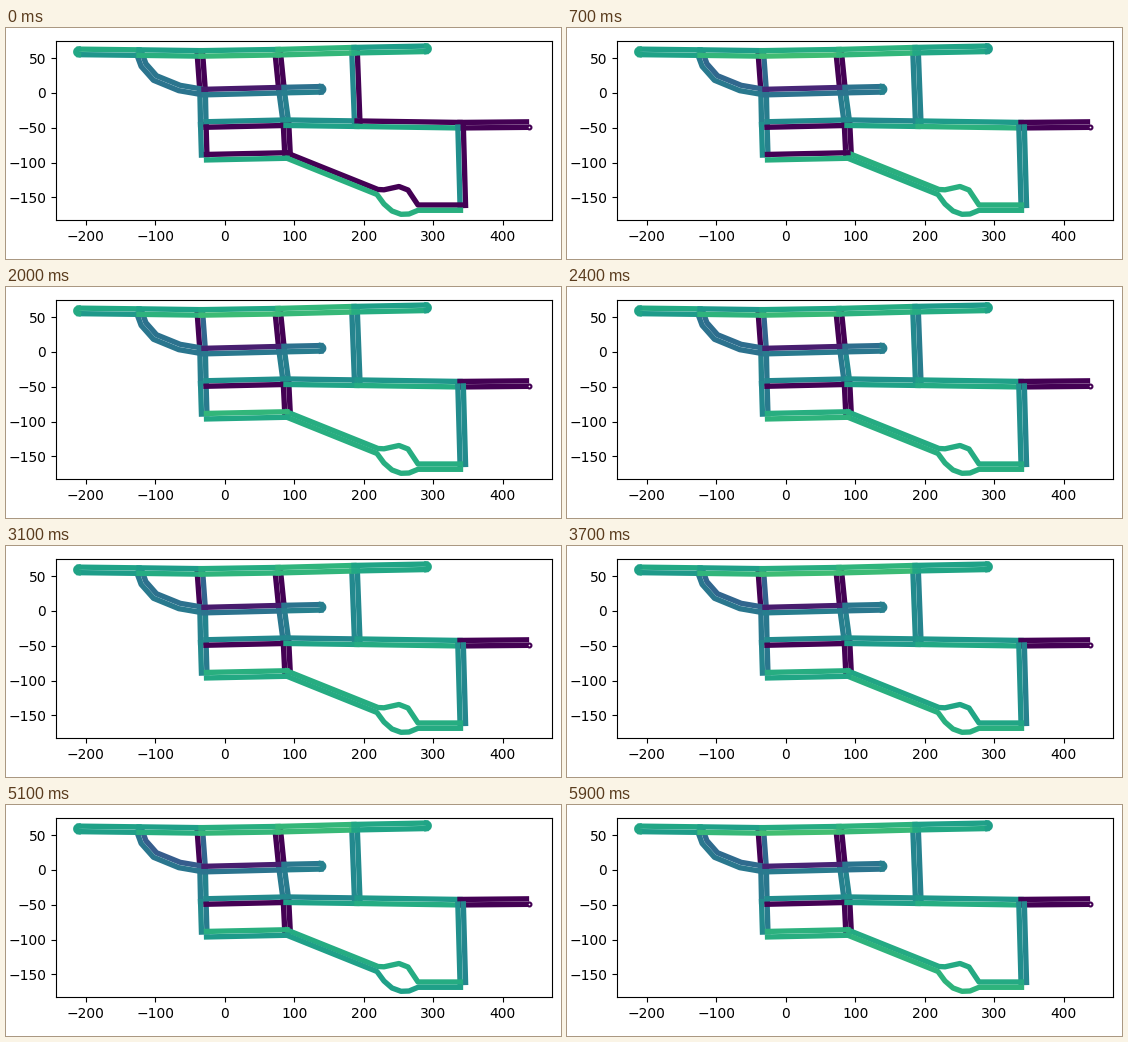
These frames come from a looping animation (555 by 231 pixels, 6000 ms). A matplotlib script:

```python
import matplotlib.pyplot as plt
import numpy as np
from matplotlib.animation import FuncAnimation
from matplotlib.collections import LineCollection

W, H, DPI = 555, 231, 100
LEFT, RIGHT, TOP, BOTTOM = 50, 546, 13, 192
SCALE = 0.695            # pixels per map unit
ORIGIN = (218.8, 65.0)   # stage position of map point (0, 0)
FRAMES, STEP = 60, 100
GAP = 2.75               # distance of a lane from the middle of its street

rng = np.random.default_rng(4)
time = np.arange(FRAMES)
rush = np.exp(-((time - 45) / 6) ** 2)   # busy spell late in the loop
paths, levels = [], []
late = 0


def to_map(points):
    p = np.asarray(points, float)
    return np.column_stack([p[:, 0] - ORIGIN[0], ORIGIN[1] - p[:, 1]]) / SCALE


def shift(points, dist):
    """Move a polyline sideways: upwards if it runs right, right if it runs down."""
    p = np.asarray(points, float)
    d = np.diff(p, axis=0)
    n = np.column_stack([d[:, 1], -d[:, 0]]) / np.hypot(*d.T)[:, None]
    n = np.vstack([n[:1], n[:-1] + n[1:], n[-1:]])
    return p + dist * n / np.hypot(*n.T)[:, None]


def lane(points, level, swing=0.0):
    """Zero stays unused; a negative level is empty until the first cars come."""
    global late
    a, b = rng.uniform(0, 2 * np.pi, 2)
    wobble = np.sin(time / 3 + a) + np.sin(time / 1.7 + b)
    series = abs(level) + 0.015 * wobble + swing * rush
    if level < 0:
        late += 1
        series[:late + 1] = 0
    paths.append(to_map(points))
    levels.append(series if level else 0 * time)


def road(points, pair, swing=(0, 0)):
    for side, level, s in zip((GAP, -GAP), pair, swing):
        lane(shift(points, side), level, s)


def street(nodes, *pairs):
    """Chain of straight roads, one pair of lane levels for each."""
    for start, end, pair in zip(nodes, nodes[1:], pairs):
        road([start, end], pair)


def turn(x, y, way, level):
    """Half circle joining both lanes at the end of a street."""
    a = np.linspace(-np.pi / 2, np.pi / 2, 9)
    lane(np.column_stack([x + way * GAP * np.cos(a), y + GAP * np.sin(a)]), level)


# vertical streets
street([(194, 27), (196.6, 63), (197.3, 96.5), (198.2, 127)],
       (-.32, 0), (.42, .43), (-.41, .47))
street([(272, 27), (275.5, 62), (280, 95.5), (281.5, 126)],
       (0, 0), (.44, .41), (0, 0))
street([(348.6, 25), (351.2, 94)], (-.45, .47))

# middle street and the curve leading to it
road([(133.5, 26), (137.5, 37), (149, 50), (173.5, 60), (194, 63.5)],
     (.36, .4), swing=(-.2, -.08))
street([(198, 64.1), (278, 62.1), (315, 61.3)], (.08, .4), (.38, .41))
turn(315, 61.3, 1, .43)

# long cross street
street([(200, 96.5), (280, 94.7), (351, 95.7), (454, 97.2), (520.5, 96.6)],
       (.47, 0), (.49, .57), (-.55, .61), (0, 0))

# lower right corner, slope with passing loop, lower street
street([(454.6, 99), (456.8, 177.5)], (-.46, .5))
lane([(281, 125), (372, 161.5), (378, 161.8), (393, 158.5), (402, 162),
      (412, 177), (454.5, 177)], -.61)
lane([(281, 130.3), (371, 166.5), (378, 176), (386, 183), (395, 186.3),
      (403, 186), (412, 182.3), (454.5, 182.3)], .63, -.16)
road([(200.5, 129.2), (281, 127.5)], (-.63, .62), swing=(0, -.15))

# top street
street([(73, 23.9), (133, 24.6), (195, 25.4), (272, 24.2), (348, 22.2), (420, 20.8)],
       (.59, .55), (.55, .64), (.61, .67), (.64, .66), (.57, .6))
turn(72.5, 23.9, -1, .58)
turn(420.5, 20.8, 1, .58)

levels = np.array(levels)

fig = plt.figure(figsize=(W / DPI, H / DPI), dpi=DPI, facecolor="white")
ax = fig.add_axes([LEFT / W, 1 - BOTTOM / H, (RIGHT - LEFT) / W, (BOTTOM - TOP) / H])
(x0, y0), (x1, y1) = to_map([(LEFT, BOTTOM), (RIGHT, TOP)])
ax.set_xlim(x0, x1)
ax.set_ylim(y0, y1)
ax.set_xticks(range(-200, 401, 100))
ax.set_yticks(range(-150, 51, 50))

lanes = LineCollection(paths, cmap="viridis", linewidths=3.85,
                       capstyle="projecting", joinstyle="round", zorder=2)
lanes.set_clim(0, 1)
ax.add_collection(lanes, autolim=False)

# turning circle at the dead end
end_x, end_y = to_map([(523, 99.4)])[0]
ax.plot(end_x, end_y, "o", ms=2.8, mfc="white", mec=plt.cm.viridis(0.0),
        mew=1.5, zorder=3)


def update(i):
    lanes.set_array(levels[:, i])
    return [lanes]


anim = FuncAnimation(fig, update, frames=FRAMES, interval=STEP, repeat=True,
                     repeat_delay=0, blit=False)
plt.show()
```
